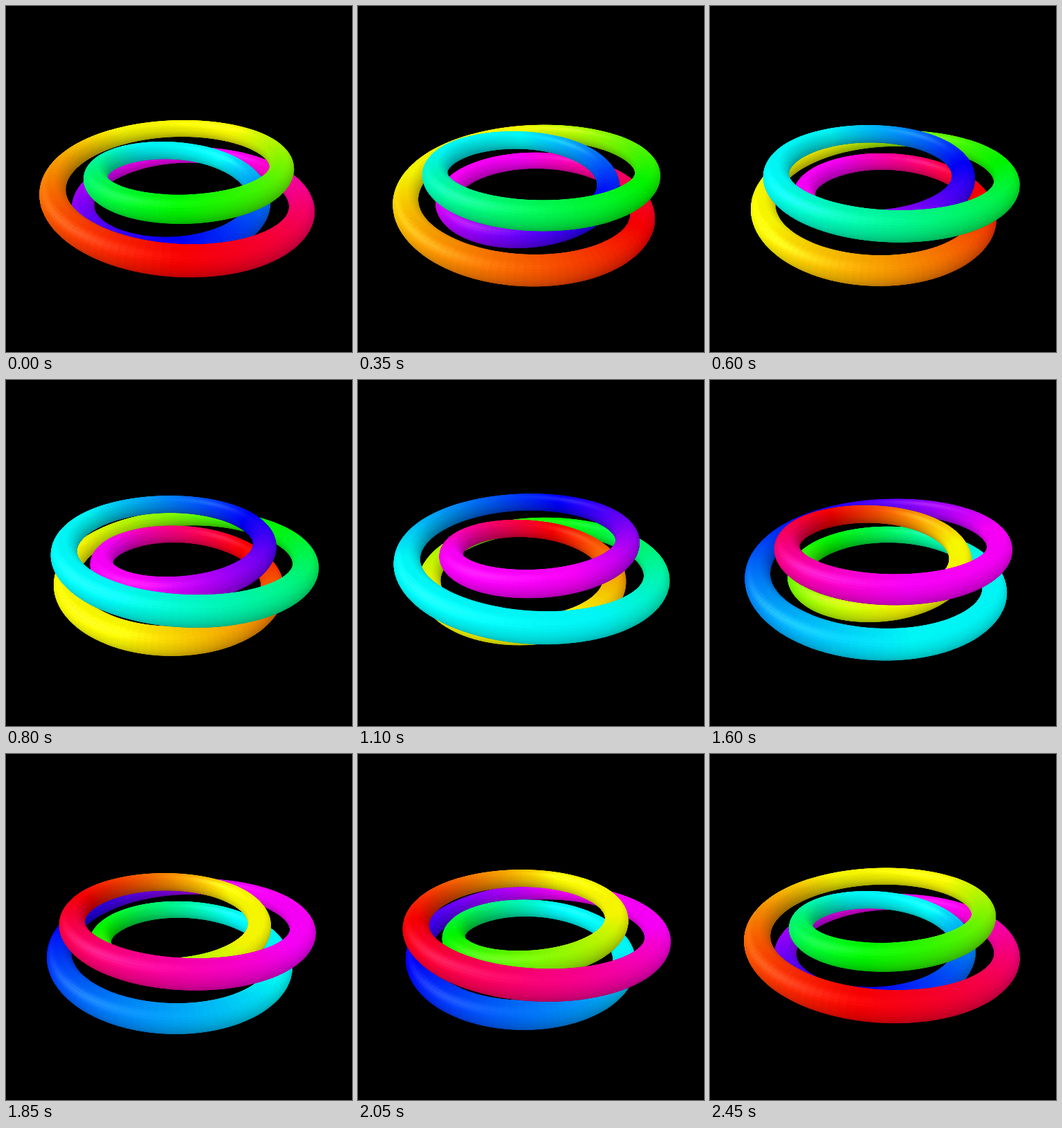
Recreate the animation shown at these times as an HTML page with a canvas. Size 500 by 500 pixels, loop 2500 ms.

```html
<!DOCTYPE html>
<html>
<head>
<meta charset="utf-8">
<style>
html, body { margin: 0; height: 100%; overflow: hidden; background: #000; }
canvas { display: block; width: 500px; height: 500px; }
</style>
</head>
<body>
<canvas id="stage" width="500" height="500"></canvas>
<script>
const ctx = document.getElementById('stage').getContext('2d');
const LOOP = 2500, STEP = 50, TAU = Math.PI * 2;
const MAJOR = 4.52, MINOR = 1, TUBE = 0.473;
const DIST = 13.98, FOCAL = 433, ELEV = Math.atan(0.5);
const CENTER_X = 250, CENTER_Y = 249.4;
const SIN = Math.sin(ELEV), COS = Math.cos(ELEV);
const SEGMENTS = 420, SIDES = 40;

const dot = (a, b) => a[0] * b[0] + a[1] * b[1] + a[2] * b[2];
const sub = (a, b) => a.map((v, i) => v - b[i]);
const unit = a => { const len = Math.hypot(...a); return a.map(v => v / len); };
const cross = (a, b) => [
  a[1] * b[2] - a[2] * b[1], a[2] * b[0] - a[0] * b[2], a[0] * b[1] - a[1] * b[0]
];

const CAMERA = [0, -DIST * COS, DIST * SIN];
const LIGHT = unit([-0.42, -0.22, 0.85]);
const HALF = unit([-0.35, -0.54, 0.77]);

// Curve that runs three times around a ring while turning once about its core
function curve(phi, turn) {
  const theta = phi / 3 - turn;
  const rho = MAJOR + MINOR * Math.cos(theta);
  return [-rho * Math.sin(phi), -rho * Math.cos(phi), MINOR * Math.sin(theta)];
}

function project([x, y, z]) {
  const scale = FOCAL / (DIST + y * COS - z * SIN);
  return [CENTER_X + x * scale, CENTER_Y - (y * SIN + z * COS) * scale];
}

// Fully saturated hue, overexposed so that mixed tones clip early
function hueColor(hue) {
  return [0, 4, 2].map(shift => {
    const k = (hue * 6 + shift) % 6;
    const level = Math.min(1, Math.max(0, Math.abs(k - 3) - 1));
    return Math.min(1, level * 1.3);
  });
}

function shade(base, normal) {
  const diffuse = Math.min(1, 0.83 + 0.23 * dot(normal, LIGHT));
  const gloss = 35 * Math.max(0, dot(normal, HALF)) ** 24;
  return `rgb(${base.map(c => Math.min(255, Math.round(246 * c * diffuse + gloss)))})`;
}

function makeRing(phi, turn) {
  const center = curve(phi, turn);
  const tangent = unit(sub(curve(phi + 0.001, turn), curve(phi - 0.001, turn)));
  const across = unit(cross([0, 0, 1], tangent));
  const up = cross(tangent, across);
  const normalAt = side => {
    const a = side / SIDES * TAU;
    return across.map((v, i) => v * Math.cos(a) + up[i] * Math.sin(a));
  };
  const points = [], screen = [], normals = [];
  for (let j = 0; j < SIDES; j++) {
    const n = normalAt(j);
    points.push(center.map((v, i) => v + TUBE * n[i]));
    screen.push(project(points[j]));
    normals.push(normalAt(j + 0.5));
  }
  return { points, screen, normals };
}

function draw(progress) {
  const turn = progress * TAU * 2 / 3;
  const rings = [], faces = [];
  for (let i = 0; i <= SEGMENTS; i++) rings.push(makeRing(i / SEGMENTS * 3 * TAU, turn));

  for (let i = 0; i < SEGMENTS; i++) {
    const a = rings[i], b = rings[i + 1];
    const base = hueColor((i + 0.5) / SEGMENTS + progress / 3);
    for (let j = 0; j < SIDES; j++) {
      const k = (j + 1) % SIDES;
      const middle = a.points[j].map((v, n) => (v + b.points[k][n]) / 2);
      const toCamera = sub(CAMERA, middle);
      if (dot(a.normals[j], toCamera) < -0.3) continue;
      faces.push({
        depth: dot(toCamera, toCamera),
        color: shade(base, a.normals[j]),
        corners: [a.screen[j], b.screen[j], b.screen[k], a.screen[k]]
      });
    }
  }

  faces.sort((p, q) => q.depth - p.depth);
  ctx.fillStyle = '#000';
  ctx.fillRect(0, 0, 500, 500);
  ctx.lineWidth = 1; // covers the seams between faces
  ctx.lineJoin = 'round';
  for (const { color, corners } of faces) {
    ctx.fillStyle = ctx.strokeStyle = color;
    ctx.beginPath();
    corners.forEach(([x, y]) => ctx.lineTo(x, y));
    ctx.closePath();
    ctx.fill();
    ctx.stroke();
  }
}

const start = performance.now();
let shown = -1;
function tick() {
  const step = Math.floor((performance.now() - start) % LOOP / STEP);
  if (step !== shown) draw(step * STEP / LOOP);
  shown = step;
  requestAnimationFrame(tick);
}
tick();
</script>
</body>
</html>
```
